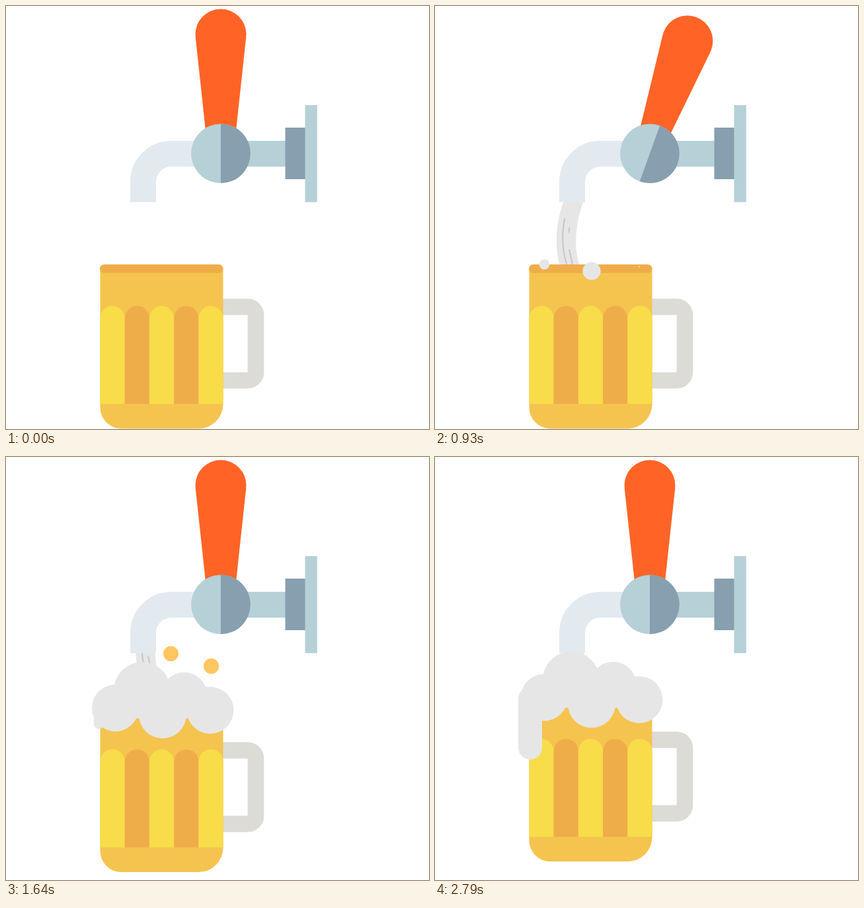
Animation, 640 px wide and 640 px high, one loop 3.57 s. Source, as an HTML page with a canvas:

```html
<!DOCTYPE html>
<html lang="en">
<head>
<meta charset="utf-8">
<title>Beer tap</title>
<style>
  html, body { margin: 0; width: 100%; height: 100%; overflow: hidden; background: #fff; }
  canvas { display: block; width: 640px; height: 640px; }
</style>
</head>
<body>
<canvas id="stage" width="640" height="640"></canvas>
<script>
const ctx = document.getElementById('stage').getContext('2d');
const LOOP = 3570;
const STEP = 1000 / 14;
const COLOR = {
  lever: '#ff6426', steel: '#b5d1d7', dark: '#879fae', spout: '#e2eaf0',
  beer: '#f5c44f', amber: '#efad4a', yellow: '#f8dc49', glass: '#dcdbd6',
  foam: '#e6e6e6', streak: '#c9c9c9', bubble: '#ffc661'
};

// Foam blobs: x, y, radius, start of growth in ms.
const FOAM = [
  [165.5, 391, 35.5, 865],
  [206, 364.5, 43, 900],
  [237, 401, 36, 820],
  [269.5, 372, 35, 925],
  [309, 394.5, 35.5, 920]
];

const clamp = v => Math.min(1, Math.max(0, v));
const span = (t, from, to) => clamp((t - from) / (to - from));

function bezier(x1, y1, x2, y2) {
  const at = (a, b, s) => 3 * a * s * (1 - s) ** 2 + 3 * b * s * s * (1 - s) + s ** 3;
  return x => {
    let lo = 0, hi = 1;
    for (let i = 0; i < 24; i++) {
      const mid = (lo + hi) / 2;
      if (at(x1, x2, mid) < x) lo = mid; else hi = mid;
    }
    return at(y1, y2, hi);
  };
}
const ease = bezier(0.25, 0.1, 0.25, 1);
const easeInOut = bezier(0.42, 0, 0.58, 1);

function rect(x, y, w, h, color, radius = 0) {
  ctx.fillStyle = color;
  ctx.beginPath();
  ctx.roundRect(x, y, w, h, radius);
  ctx.fill();
}

function circle(x, y, r, color) {
  if (r <= 0) return;
  ctx.fillStyle = color;
  ctx.beginPath();
  ctx.arc(x, y, r, 0, Math.PI * 2);
  ctx.fill();
}

function fillPath(d, color) {
  ctx.fillStyle = color;
  ctx.fill(new Path2D(d));
}

function rotated(x, y, angle, draw) {
  ctx.save();
  ctx.translate(x, y);
  ctx.rotate(angle);
  draw();
  ctx.restore();
}

function drawStream(t) {
  const drop = -107 + 126.6 * ease(span(t, 0, 1000)) - 67 * ease(span(t, 1000, 1375));
  ctx.save();
  ctx.beginPath();
  ctx.rect(0, 290, 640, 350);
  ctx.clip();
  ctx.translate(-0.18 * drop, drop);
  fillPath('M198 276C188 305 182 340 194 380H223.5C211 340 218 305 228 276Z', COLOR.foam);
  ctx.strokeStyle = COLOR.streak;
  ctx.lineWidth = 2.2;
  ctx.stroke(new Path2D('M199.7 302C195 325 196 350 202.8 372M207 316L206 323.5M206.5 349L212 374'));
  ctx.restore();
}

function drawTap(t) {
  const turn = easeInOut(span(t, 0, 1000)) - easeInOut(span(t, 1100, 1600));
  const angle = turn * Math.PI / 9;

  ctx.strokeStyle = COLOR.spout;
  ctx.lineWidth = 39;
  ctx.stroke(new Path2D('M207.5 296.7V266A42.5 42.5 0 0 1 250 223.5H325'));
  rect(325, 204, 98, 39, COLOR.steel);
  rect(422.5, 184, 30.5, 78, COLOR.dark);
  rect(452.5, 150, 18.3, 146.7, COLOR.steel);

  rotated(325, 211, angle, () => {
    circle(0, -168, 38.5, COLOR.lever);
    fillPath('M-38.3 -164L-20.6 0H20.6L38.3 -164Z', COLOR.lever);
  });
  circle(325, 223.2, 44.8, COLOR.steel);
  rotated(325, 223.2, angle, () => fillPath('M0 -44.8A44.8 44.8 0 0 1 0 44.8Z', COLOR.dark));
}

function drawMug() {
  ctx.strokeStyle = COLOR.glass;
  ctx.lineWidth = 24.7;
  ctx.stroke(new Path2D('M320 455.2H365.5A12.5 12.5 0 0 1 378 467.7V554A12.5 12.5 0 0 1 365.5 566.5H320'));
  rect(142.5, 397, 186, 242.4, COLOR.beer, [0, 0, 37, 32]);
  for (let i = 0; i < 5; i++) {
    rect(142.5 + i * 37.2, 453.7, 37.2, 148.3, i % 2 ? COLOR.amber : COLOR.yellow, [18.6, 18.6, 0, 0]);
  }
  rect(142, 391, 186.5, 13, COLOR.amber, 6.5);
}

function drawFoam(t) {
  for (const [x, y, r, start] of FOAM) {
    const scale = 1.2 * span(t, start, start + 345) - 0.2 * span(t, start + 345, start + 500);
    circle(x, y, r * scale, COLOR.foam);
  }
  const drip = ease(span(t, 1430, 2300));
  if (drip > 0) {
    ctx.save();
    ctx.translate(137.7, 382);
    ctx.scale(drip, drip);
    rect(-11.7, -7, 36, 110, COLOR.foam, 18);
    ctx.restore();
  }
}

function drawBubbles(t, lift) {
  if (t > 1350 && t < 2370) {
    const fade = Math.exp(-Math.max(0, t - 1643) / 285);
    const rise = Math.exp(-(t - 1643) / 325);
    circle(249.5, 272 + 25.5 * rise, 11.5 * easeInOut(span(t, 1350, 1640)) * fade, COLOR.bubble);
  }
  const pop = (from, peak, to) => easeInOut(span(t, from, peak)) - easeInOut(span(t, peak, to));
  circle(310.5, 327.7 - lift, 11.6 * pop(1350, 1640, 1910) + 12.3 * pop(2050, 2380, 2780), COLOR.bubble);
}

function draw(t) {
  const lift = 8 * easeInOut(span(t, 1050, 1500)) + 19.3 * easeInOut(span(t, 1500, 2000));
  ctx.fillStyle = '#fff';
  ctx.fillRect(0, 0, 640, 640);
  drawStream(t);
  drawBubbles(t, lift);
  drawTap(t);
  ctx.save();
  ctx.translate(0, -lift);
  drawMug();
  drawFoam(t);
  ctx.restore();
}

// The motion advances at 14 poses per second, on a 10 ms clock.
function poseTime(t) {
  let n = Math.floor(t / STEP) + 1;
  while (Math.round(n * STEP / 10) * 10 > t) n--;
  return n * STEP;
}

const begin = performance.now();
function tick() {
  draw(poseTime((performance.now() - begin) % LOOP));
  requestAnimationFrame(tick);
}
tick();
</script>
</body>
</html>
```
